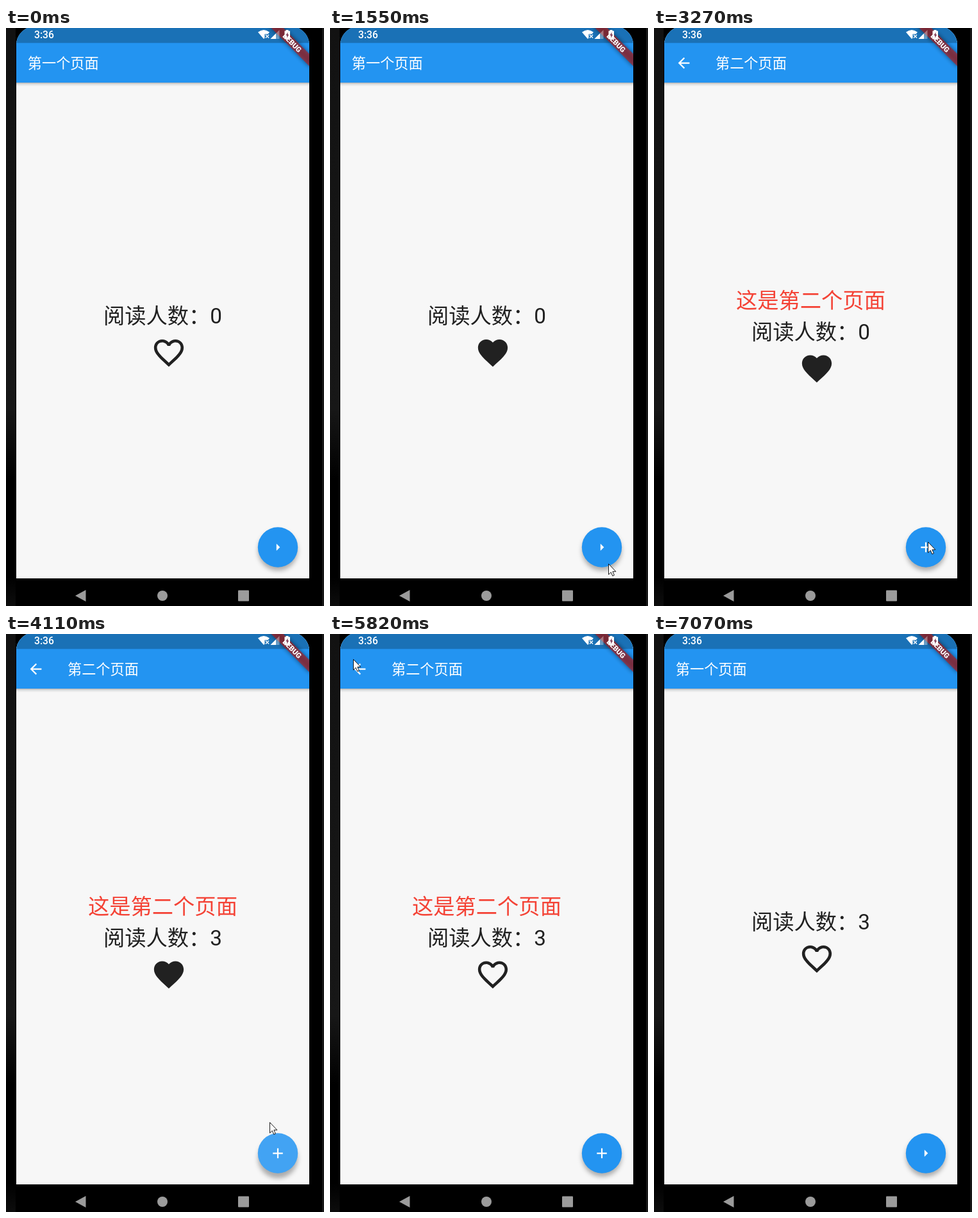
These frames come from a looping animation (496 by 900 pixels, 7540 ms). An HTML page:

```html
<!DOCTYPE html>
<html lang="zh-CN">
<head>
<meta charset="utf-8">
<title>阅读人数</title>
<style>
  html, body { margin: 0; width: 100%; height: 100%; overflow: hidden; background: #000; }
  svg { display: block; width: 496px; height: 900px; }
  text { font-family: Roboto, "Noto Sans CJK SC", "Noto Sans CJK", sans-serif; white-space: pre; }
  .title { font-size: 22.2px; fill: #fff; }
  .body { font-size: 33.3px; fill: #212121; }
</style>
</head>
<body>
<svg viewBox="0 0 496 900">
  <defs>
    <linearGradient id="bezel" x2="0" y2="1">
      <stop offset="0" stop-color="#121212"/>
      <stop offset=".66" stop-color="#171717"/>
      <stop offset=".78" stop-color="#000"/>
      <stop offset=".95" stop-color="#000"/>
      <stop offset="1" stop-color="#0d0d0d"/>
    </linearGradient>
    <linearGradient id="barShade" x2="0" y2="1">
      <stop offset="0" stop-opacity=".28"/>
      <stop offset=".4" stop-opacity=".1"/>
      <stop offset="1" stop-opacity="0"/>
    </linearGradient>
    <filter id="blur" x="-50%" y="-50%" width="200%" height="200%"><feGaussianBlur stdDeviation="3.5"/></filter>
    <clipPath id="screen"><path d="M16 900V24Q18 8 33 0H456Q471 8 473 24V900Z"/></clipPath>
    <clipPath id="fabClip"><circle cx="424" cy="808.5" r="31.2"/></clipPath>
    <g id="scaffold">
      <rect x="16" y="-4" width="457" height="861" fill="#f7f7f7"/>
      <rect x="16" y="85" width="457" height="6" fill="url(#barShade)"/>
      <rect x="16" y="-4" width="457" height="89" fill="#2394f1"/>
    </g>
  </defs>

  <rect width="496" height="900"/>
  <rect width="15" height="900" fill="url(#bezel)"/>
  <rect x="493.5" width="2" height="900" fill="#222"/>

  <g clip-path="url(#screen)">
    <g id="first">
      <use href="#scaffold"/>
      <text class="title" x="33.8" y="62.8">第一个页面</text>
      <g class="reader"></g>
    </g>
    <g id="second">
      <use href="#scaffold"/>
      <circle id="backRipple" cx="46.5" cy="54.5" r="29" fill="#fff"/>
      <path transform="translate(33.2 41.2) scale(1.11)" fill="#fff"
        d="M20 11H7.83l5.59-5.59L12 4l-8 8 8 8 1.41-1.41L7.83 13H20v-2z"/>
      <text class="title" x="96" y="62.8">第二个页面</text>
      <text class="body" x="127.9" y="435.5" style="fill:#f44336">这是第二个页面</text>
      <g class="reader" transform="translate(0 24.5)"></g>
    </g>

    <g id="fab">
      <circle id="fabShade" cx="424" cy="814" r="31" fill-opacity=".3" filter="url(#blur)"/>
      <circle cx="424" cy="808.5" r="31.2" fill="#2394f1"/>
      <circle id="fabRipple" cx="424" cy="808.5" fill="#fff" clip-path="url(#fabClip)"/>
      <path id="fabIcon" transform="translate(410.7 795.2) scale(1.11)" fill="#fff"/>
    </g>

    <rect x="16" y="0" width="457" height="23.3" fill="#1a71b6"/>
    <g transform="translate(473 -3.5) rotate(45)">
      <rect x="-45" y="31" width="90" height="13.4" fill-opacity=".5" filter="url(#blur)"/>
      <rect x="-45" y="31" width="90" height="13.4" fill="#b71c1c" fill-opacity=".63"/>
      <text x="0" y="41.7" text-anchor="middle" fill="#fff" font-size="11.3" font-weight="900">DEBUG</text>
    </g>
    <text x="44" y="16.3" font-size="15.7" font-weight="500" fill="#fff">3:36</text>
    <g fill="#fff">
      <path d="M393 6.5Q402 -.5 411 6.5L408.5 9.5H403.5V15.5L402 17Z"/>
      <path d="M405 10.5l5 5m0-5l-5 5" stroke="#fff" stroke-width="1.4"/>
      <path d="M412.5 17L426.5 3V17Z" fill-opacity=".35"/>
      <path d="M412.5 17L421 8.5V17Z"/>
      <path d="M436.5 4.5V3H440.5V4.5H443V17.5H434.5V4.5Z"/>
      <path d="M439.5 6.5L436.5 11.6H438.3V15.5L441.2 10.3H439.5Z" fill="#7d3550"/>
    </g>

    <rect x="16" y="857" width="457" height="43"/>
    <g fill="#9b9b9b">
      <path d="M108 884L124.5 875V893Z"/>
      <circle cx="244" cy="884" r="8"/>
      <rect x="362" y="875.5" width="17" height="17" rx="1"/>
    </g>
  </g>

  <path id="cursor" d="M.5 .5V17L4.3 13.4 6.8 19.2 9.4 18 6.9 12.3H11.8Z"
    fill="#fff" stroke="#000" stroke-width=".9"/>
</svg>

<script>
const LOOP = 7540, STEP = 77.5, SLIDE = 215;
const PUSH = 1920, POP = 6000, TRANSITION = 300;
const HEART_TAPS = [840, 4800], FAB_TAPS = [1790, 3560, 3760, 3960], BACK_TAP = 5850;
const CURSOR_IN = 77, CURSOR_OUT = 7050;
const PLUS = 'M19 13h-6v6h-2v-6H5v-2h6V5h2v6h6v2z';
const ARROW = 'M10 17l5-5-5-5v10z';
const HEART = 'M16.5 3c-1.74 0-3.41.81-4.5 2.09C10.91 3.81 9.24 3 7.5 3 4.42 3 2 5.42 2 8.5c0 3.78 3.4 6.86 8.55 11.54L12 21.35l1.45-1.32C18.6 15.36 22 12.28 22 8.5 22 5.42 19.58 3 16.5 3z';
const HEART_HOLE = 'm-4.4 15.55l-.1.1-.1-.1C7.14 14.24 4 11.39 4 8.5 4 6.5 5.5 5 7.5 5c1.54 0 3.04.99 3.57 2.36h1.87C13.46 5.99 14.96 5 16.5 5c2 0 3.5 1.5 3.5 3.5 0 2.89-3.14 5.74-7.9 10.05z';

// time, x, y of the pointer tip
const CURSOR_PATH = [
  [77, 396, 890], [620, 258, 508], [930, 258, 508], [1550, 434, 834],
  [1700, 434, 821], [2400, 434, 821], [2750, 319, 568], [3100, 424, 782],
  [3180, 434, 790], [3255, 427, 800], [3330, 418, 799], [3980, 418, 799],
  [4107, 411, 760], [4190, 372, 672], [4500, 262, 512], [4900, 261, 523],
  [5040, 261, 523], [5735, 36, 42], [5812, 36, 39], [6200, 36, 39],
  [6520, 95, 213], [7050, 470, 890]
];

const $ = id => document.getElementById(id);
const set = (el, attrs) => { for (const k in attrs) el.setAttribute(k, attrs[k]); };
const clamp = v => Math.min(1, Math.max(0, v));
const mix = (a, b, k) => a + (b - a) * k;

function bezier(x1, y1, x2, y2) {
  const at = (a, b, s) => 3 * a * s * (1 - s) ** 2 + 3 * b * s * s * (1 - s) + s ** 3;
  return x => {
    let lo = 0, hi = 1;
    for (let i = 0; i < 24; i++) {
      const mid = (lo + hi) / 2;
      if (at(x1, x2, mid) < x) lo = mid; else hi = mid;
    }
    return at(y1, y2, hi);
  };
}
const fastOutSlowIn = bezier(.4, 0, .2, 1);
const easeIn = bezier(.42, 0, 1, 1);

for (const group of document.querySelectorAll('.reader')) {
  group.innerHTML = `
    <circle class="ripple" cx="246" cy="496" r="23" fill="#888"/>
    <text class="body count" x="151.9" y="460"></text>
    <path class="heart" transform="translate(226.2 478) scale(2.315)" fill="#212121" fill-rule="evenodd"/>`;
}
const counts = document.querySelectorAll('.count');
const hearts = document.querySelectorAll('.heart');
const heartRipples = document.querySelectorAll('.ripple');

// Rises over 100 ms before falling away
function pulse(t, start, length) {
  const age = t - start;
  return age < 0 ? 0 : Math.min(clamp(age / 100), clamp((length - age) / 200));
}

function cursorAt(t) {
  let i = 1;
  while (i < CURSOR_PATH.length - 1 && CURSOR_PATH[i][0] < t) i++;
  const [t0, x0, y0] = CURSOR_PATH[i - 1], [t1, x1, y1] = CURSOR_PATH[i];
  const k = clamp((t - t0) / (t1 - t0)), e = k * k * (3 - 2 * k);
  return [mix(x0, x1, e), mix(y0, y1, e)];
}

function render(t) {
  const shown = t < POP ? clamp((t - PUSH) / TRANSITION) : 1 - clamp((t - POP) / TRANSITION);
  set($('second'), {
    opacity: easeIn(shown),
    transform: `translate(0 ${SLIDE * (1 - fastOutSlowIn(shown))})`,
    visibility: shown > 0 ? 'visible' : 'hidden'
  });

  const count = FAB_TAPS.slice(1).filter(tap => t >= tap).length;
  const liked = t >= HEART_TAPS[0] && t < HEART_TAPS[1];
  counts.forEach(el => el.textContent = '阅读人数：' + count);
  hearts.forEach(el => set(el, { d: liked ? HEART : HEART + HEART_HOLE }));
  heartRipples.forEach((el, i) => set(el, { opacity: .15 * pulse(t, HEART_TAPS[i] - 160, 420) }));
  set($('backRipple'), { opacity: .15 * pulse(t, BACK_TAP, 350) });

  const tap = FAB_TAPS.filter(time => t >= time).pop() ?? -LOOP;
  const press = pulse(t, tap, 400);
  set($('fabRipple'), { r: 34 * clamp((t - tap) / 150), opacity: .14 * press });
  set($('fabShade'), { cy: 814 + 2.5 * press });
  set($('fabIcon'), { d: t >= PUSH && t < POP ? PLUS : ARROW });

  const [x, y] = cursorAt(t);
  set($('cursor'), {
    transform: `translate(${x.toFixed(1)} ${y.toFixed(1)})`,
    visibility: t >= CURSOR_IN && t < CURSOR_OUT ? 'visible' : 'hidden'
  });
}

const start = performance.now();
function tick() {
  const t = (performance.now() - start) % LOOP;
  render(Math.floor(t / STEP) * STEP);
  requestAnimationFrame(tick);
}
tick();
</script>
</body>
</html>
```
